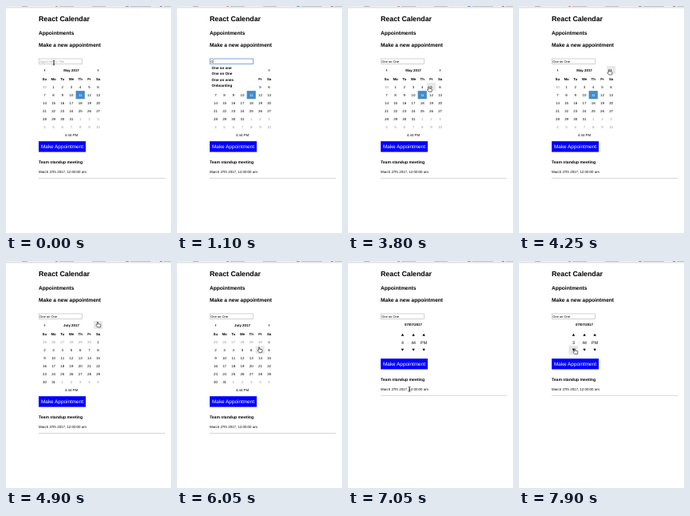
Write an HTML page that moves like this. It is 207 px wide and 284 px high and loops after 8 s.

```html
<!DOCTYPE html>
<html lang="en">
<head>
<meta charset="utf-8">
<title>React Calendar</title>
<style>
html, body { margin: 0; width: 100%; height: 100%; overflow: hidden; background: #fff; }
svg { display: block; width: 207px; height: 284px; font-family: "Liberation Sans", Arial, sans-serif; text-rendering: geometricPrecision; }
</style>
</head>
<body>
<svg id="stage" viewBox="0 0 207 284" xmlns="http://www.w3.org/2000/svg"></svg>
<script>
const LOOP = 8000, STEP = 50;
const COL = 11.2, ROW = 10.15, LEFT = 42.8, TOP = 96;
const stage = document.getElementById('stage');

const rect = (x, y, w, h, fill, extra = '') =>
  `<rect x="${x}" y="${y}" width="${w}" height="${h}" fill="${fill}" ${extra}/>`;

function text(s, x, y, size, o = {}) {
  return `<text x="${x}" y="${y}" font-size="${size}" fill="${o.fill || '#000'}" ` +
    `text-anchor="${o.mid ? 'middle' : 'start'}" font-weight="${o.bold ? 700 : 400}">${s}</text>`;
}

const tri = (x, y, dir) =>
  `<path d="M${x - 1.7} ${y + 1.5 * dir}h3.4l-1.7 ${-3 * dir}z"/>`;

// Pointer path: time, x, y
const path = [
  [0, 60, 71], [200, 60, 71], [250, 78, 73], [300, 125, 79], [350, 180, 84], [400, 225, 87],
  [3150, 225, 110], [3250, 196, 112], [3450, 184, 111], [3800, 102.5, 104], [4000, 103, 103],
  [4300, 115, 81], [4500, 116, 79.5], [4950, 116, 79.5], [5650, 104, 109.5], [5700, 104.5, 110],
  [6000, 104.5, 110], [6600, 84, 161], [6850, 77, 160.5], [7100, 77, 160.5], [7600, 71, 113], [8000, 71, 113]
];

function pointer(t) {
  const i = path.findIndex(p => p[0] > t);
  const [t0, x0, y0] = path[i - 1], [t1, x1, y1] = path[i];
  const k = (t - t0) / (t1 - t0), e = k * k * (3 - 2 * k);
  return { x: x0 + (x1 - x0) * e, y: y0 + (y1 - y0) * e };
}

function shape(t) {
  if (t < 300 || (t >= 6900 && t < 7200)) return 'beam';
  if (t < 3650 || (t >= 7200 && t < 7400)) return 'arrow';
  return 'hand';
}

function drawPointer(t, p) {
  const d = {
    beam: 'M-1.3 -3Q0 -3 0 -2Q0 -3 1.3 -3M0 -2V2M-1.3 3Q0 3 0 2Q0 3 1.3 3M-.8 .8H.8',
    arrow: 'M-2 -4V2.6L-.5 1.3L.5 3.7L1.6 3.2L.6 .9H2.6Z',
    hand: 'M-1.7 .4V-2.9Q-1.1 -3.8 -.5 -2.9V-.8L2.3 -.4Q3 -.1 2.9 .7L2.3 3.4H-1.2L-3.1 .9Q-2.9 -.1 -1.7 .4Z'
  };
  const kind = shape(t);
  const paint = kind === 'beam' ? 'fill="none" stroke="#222" stroke-width=".75"'
    : kind === 'arrow' ? 'fill="#000" stroke="#fff" stroke-width=".5"'
    : 'fill="#fff" stroke="#222" stroke-width=".65" stroke-linejoin="round"';
  return `<path transform="translate(${p.x} ${p.y})" d="${d[kind]}" ${paint}/>`;
}

const inside = (p, x, y, w, h) => p.x >= x && p.x < x + w && p.y >= y && p.y < y + h;

function typed(t) {
  const keys = [900, 1350, 1450, 1550, 1650, 1750, 1900, 2150, 2300, 2450];
  return 'One on One'.slice(0, keys.filter(k => k <= t).length);
}

function field(t) {
  const focus = t >= 50 && t < 3400, s = typed(t);
  let out = rect(41.2, 66, 54.4, 6.4, '#fff', `stroke="${focus ? '#6f9be0' : '#b4b4b4'}" stroke-width="${focus ? .9 : .6}"`);
  out += s ? text(s, 42.2, 70.6, 4) : text('Appointment Title', 42.2, 70.6, 4, { fill: '#a9a9a9' });
  const on = focus && !(t >= 700 && t < 750) && t < 3000;
  if (on) {
    const w = [...s].reduce((a, c) => a + (c === 'O' ? .778 : c === ' ' ? .278 : .556), 0) * 4;
    out += rect(42.3 + w, 67.2, .4, 4.2, '#333');
  }
  return out;
}

function popup(t) {
  if (t < 950 || t >= 3250) return '';
  const n = t < 1650 ? 4 : t < 2200 ? 3 : 2;
  const rows = ['One on one', 'One on One', 'One on ones', 'Onboarding'].slice(0, n);
  return rect(41, 73.2, 55, n * 7.5 - .3, '#fff') +
    rows.map((r, i) => text(r, 43.6, 78.6 + i * 7.5, 4.55, { bold: 1 })).join('');
}

function calendar(t, tip) {
  // lead = days of the previous month shown, prev = its length
  const m = t < 4700 ? { name: 'May', lead: 1, prev: 30, len: 31, pick: 11 }
    : t < 4850 ? { name: 'June', lead: 4, prev: 31, len: 30 }
    : { name: 'July', lead: 6, prev: 30, len: 31, pick: t >= 6100 ? 7 : 0 };
  let out = '';
  for (const x of [LEFT, LEFT + 6 * COL])
    if (inside(tip, x, 75, COL, 10)) out += rect(x, 75, COL, 10, '#e9e9e9');
  out += text('‹', 48.4, 82.3, 6, { mid: 1, bold: 1 }) + text('›', 115.6, 82.3, 6, { mid: 1, bold: 1 });
  out += text(m.name + ' 2017', 82, 81.7, 4.4, { mid: 1, bold: 1 });
  ['Su', 'Mo', 'Tu', 'We', 'Th', 'Fr', 'Sa'].forEach((d, i) => {
    out += text(d, LEFT + (i + .5) * COL, 92.6, 4.4, { mid: 1, bold: 1 });
  });
  for (let i = 0; i < 42; i++) {
    const x = LEFT + (i % 7) * COL, y = TOP + Math.floor(i / 7) * ROW;
    const n = i - m.lead + 1, other = n < 1 || n > m.len;
    const day = n < 1 ? m.prev + n : n > m.len ? n - m.len : n;
    const picked = !other && n === m.pick;
    if (picked) out += rect(x, y, COL, ROW, '#428bca');
    else if (inside(tip, x, y, COL, ROW)) out += rect(x, y, COL, ROW, '#e9e9e9');
    out += text(day, x + COL / 2, y + 6.6, 4.4, { mid: 1, fill: picked ? '#fff' : other ? '#999' : '#000' });
  }
  if (inside(tip, LEFT, 156.9, 7 * COL, 10)) out += rect(LEFT, 156.9, 7 * COL, 10, '#e9e9e9');
  return out + text('4:44 PM', 82, 163.3, 4.4, { mid: 1 });
}

function clock(t, tip) {
  let out = text('07/07/2017', 82, 81.2, 4.4, { mid: 1, bold: 1 });
  const parts = [[68.4, t < 7750 ? '4' : '3'], [82.1, '44'], [95.1, 'PM']];
  for (const [x, s] of parts) {
    if (inside(tip, x - 5.9, 106, 11.4, 11)) out += rect(x - 5.9, 106, 11.4, 11, '#e6e6e6');
    out += tri(x, 92.3, 1) + text(s, x, 104.2, 5.3, { mid: 1 }) + tri(x, 111.2, -1);
  }
  return out + text(':', 75.3, 103.8, 5, { mid: 1, fill: '#666' });
}

function footer(y) {
  return `<g transform="translate(0 ${y})">` +
    rect(41, 169.2, 59, 13.4, '#00f') +
    text('Make Appointment', 70.5, 178.2, 6.4, { mid: 1, fill: '#fff' }) +
    text('Team standup meeting', 41, 197.1, 5.1, { bold: 1 }) +
    text('March 27th 2017, 12:00:00 am', 41, 208.7, 4.4) +
    rect(41, 215, 158.5, .6, '#bbb') + '</g>';
}

function chrome() {
  const bits = [[20, 7, '#aaa'], [62, 3, '#e0708c'], [67, 18, '#bbb'], [108, 17, '#bbb'],
    [150, 4, '#5b8fd6'], [156, 26, '#bbb'], [193, 3, '#777'], [198, 9, '#bbb']];
  return rect(0, 0, 207, 2, '#f0f0f0') + rect(0, 1.7, 207, .6, '#c4c4c4') +
    bits.map(([x, w, c]) => rect(x, 0, w, .8, c)).join('');
}

function draw(t) {
  const p = pointer(t), timing = t >= 6900;
  const tip = shape(t) === 'hand' ? { x: p.x - 1.1, y: p.y - 3 } : { x: -9, y: -9 };
  stage.innerHTML = rect(0, 0, 207, 284, '#fff') + chrome() +
    text('React Calendar', 41, 19.1, 8.8, { bold: 1 }) +
    text('Appointments', 41, 36.2, 6.6, { bold: 1 }) +
    text('Make a new appointment', 41, 51.3, 6.6, { bold: 1 }) +
    field(t) + (timing ? clock(t, tip) : calendar(t, tip)) +
    popup(t) + footer(timing ? -47.1 : 0) + drawPointer(t, p);
}

const start = performance.now();
let last = 0;
function tick() {
  const t = Math.floor(((performance.now() - start) % LOOP) / STEP) * STEP;
  if (t !== last) draw(last = t);
  requestAnimationFrame(tick);
}
draw(0);
tick();
</script>
</body>
</html>
```
